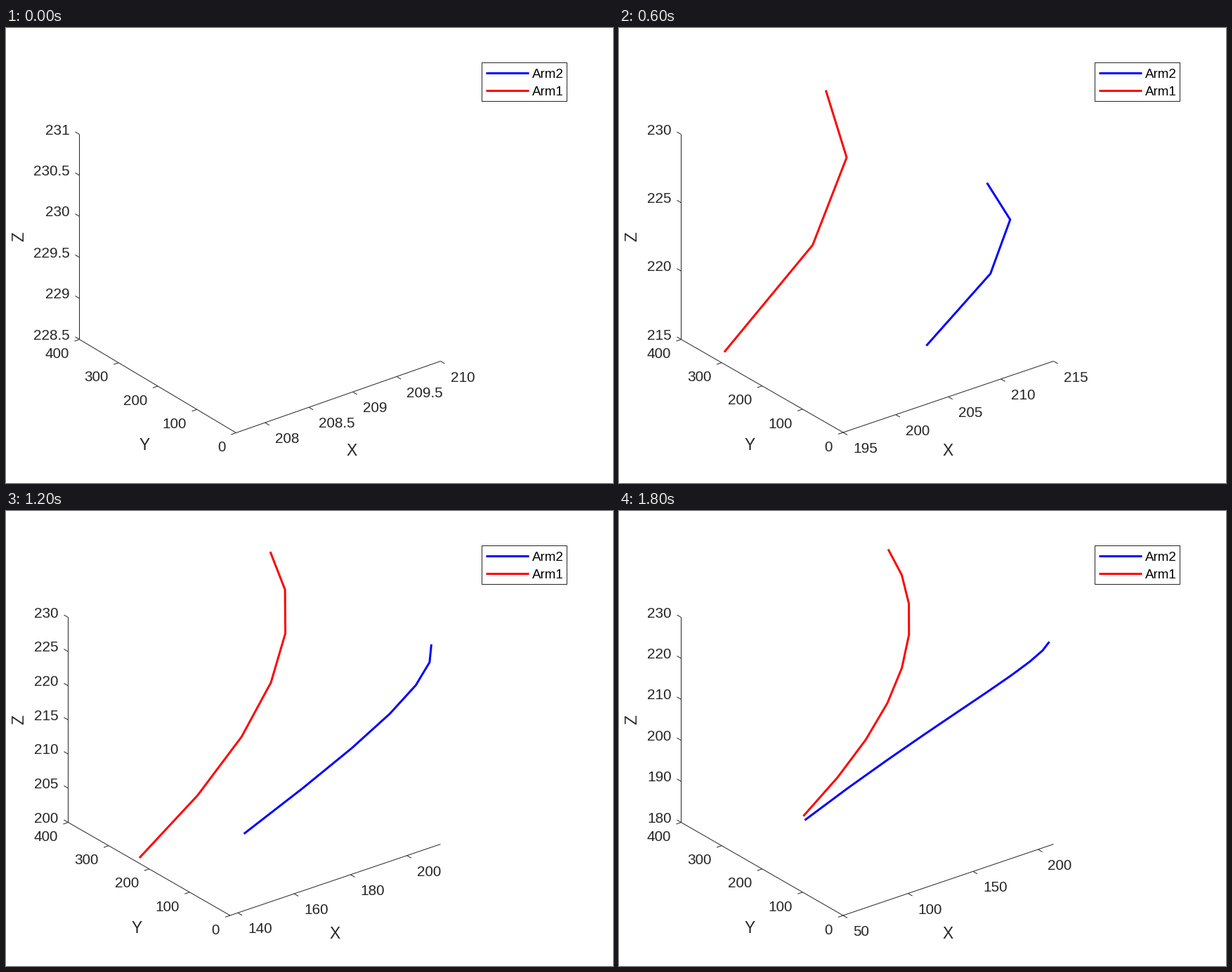
These frames come from a looping animation (864 by 648 pixels, 2000 ms). A matplotlib script:

```python
import numpy as np
import matplotlib.pyplot as plt
from matplotlib.animation import FuncAnimation
from matplotlib.patches import Rectangle

W, H = 864, 648
STEPS = 10
INK = "#262626"
TICK_SIZE, LABEL_SIZE, LEGEND_SIZE = 20.8, 22.9, 18.7
CAP = 0.345  # half the cap height, in ems

plt.rcParams["font.family"] = "Liberation Sans"
plt.rcParams["path.snap"] = False


def smooth_path(keys, count):
    """Smooth curve through {step: (x, y, z)}, sampled once per step."""
    curve = np.polyfit(list(keys), list(keys.values()), len(keys) - 1)
    steps = np.arange(count)[:, None]
    return sum(c * steps ** n for n, c in enumerate(curve[::-1]))


ARM1 = smooth_path({0: (208.67, 398, 229.7), 1: (209.46, 367, 225.1),
                    3: (195.4, 304, 215.6), 6: (137.26, 224, 200.8),
                    8: (76.1, 182, 191.1)}, STEPS - 1)
ARM2 = smooth_path({0: (208.67, 0, 229.7), 1: (211.92, 27, 225.7),
                    3: (206.2, 85.5, 216.97), 6: (167.0, 173, 201.9),
                    9: (99.6, 254, 183.5)}, STEPS)

fig = plt.figure(figsize=(W / 72, H / 72), dpi=72, facecolor="white")
ax = fig.add_axes([0, 0, 1, 1])


def nice_step(span, parts):
    """Smallest 1-2-5 step that splits span into at most that many parts."""
    raw = span / parts
    power = 10 ** np.floor(np.log10(raw))
    return next(m * power for m in (1, 2, 5, 10) if m * power >= raw)


def limits(values, parts, loose=False):
    """Axis start, end and tick step; loose ends may stay at the data."""
    low, high = values.min(), values.max()
    lone = high - low < 1e-6
    if lone:
        low, high = low - 1, high + 1
    step = nice_step(high - low, parts)
    start = np.floor(low / step) * step
    end = np.ceil(high / step) * step
    if loose and lone:
        start = low
    elif loose and (high - low) / (end - start) < 0.79:
        end = high
        if low - start > 0.8 * step:
            start = low
    return start, end, step


def ticks(start, end, step):
    first = np.ceil(start / step - 1e-6) * step
    return np.arange(first, end + step * 1e-3, step)


def stroke(points, color=INK, width=1.0):
    xs, ys = np.transpose(points)
    ax.plot(xs, ys, color=color, lw=width,
            solid_capstyle="butt", solid_joinstyle="round")


def label(x, y, text, size=TICK_SIZE, align="left", color=INK):
    """Place text with its capitals centred on y."""
    ax.text(x, y + CAP * size, text, size=size, ha=align,
            va="baseline", color=color)


def draw_axis(values, place, tick, offset, align):
    for value in values:
        p = place(value)
        stroke([p, p + tick])
        label(*(p + offset), f"{value:g}", align=align)


def draw_legend():
    ax.add_patch(Rectangle((677, 49), 121, 55, fc="white", ec=INK, lw=1))
    for y, color, name in ((64, "blue", "Arm2"), (89, "red", "Arm1")):
        stroke([(683, y), (744, y)], color, 3)
        label(748, y + 0.5, name, LEGEND_SIZE, color="black")


def draw(step):
    ax.clear()
    ax.set_xlim(-0.5, W - 0.5)
    ax.set_ylim(H - 0.5, -0.5)
    ax.axis("off")

    arms = [(ARM2[:step + 1], "blue"), (ARM1[:step + 1], "red")]
    data = np.vstack([arm for arm, _ in arms])
    x0, x1, dx = limits(data[:, 0], 4.5, loose=True)
    z0, z1, dz = limits(data[:, 2], 6)

    # Long tick labels push the axes to the right
    wide = dz < 1
    origin = np.array([327, 576] if wide else [318.5, 575.5])
    along_x = np.array([618, 474]) - origin
    along_y = np.array([104 if wide else 88, 443]) - origin
    along_z = np.array([0, -292])

    def project(x, y, z):
        return (origin + along_x * (x - x0) / (x1 - x0)
                + along_y * y / 400 + along_z * (z - z0) / (z1 - z0))

    stroke([origin + along_x, origin, origin + along_y])
    stroke([origin + along_y, origin + along_y + along_z])

    x_tick = -7 * along_y / np.hypot(*along_y)
    y_tick = -7.5 * along_x / np.hypot(*along_x)
    draw_axis(ticks(x0, x1, dx), lambda v: project(v, 0, z0),
              x_tick, (14, 22), "left")
    draw_axis(range(0, 401, 100), lambda v: project(x0, v, z0),
              y_tick, (-15, 19.5), "right")
    draw_axis(ticks(z0, z1, dz), lambda v: project(x0, 400, v),
              -x_tick, (-14, -7), "right")

    label(492 if wide else 468, 600.5, "X", LABEL_SIZE, "center")
    label(197 if wide else 186, 592.5, "Y", LABEL_SIZE, "center")
    ax.text(17 + CAP * LABEL_SIZE, 297, "Z", size=LABEL_SIZE, color=INK,
            rotation=90, rotation_mode="anchor", ha="center", va="baseline")

    for arm, color in arms:
        stroke([project(*p) for p in arm], color, 3)
    draw_legend()
    return []


anim = FuncAnimation(fig, draw, frames=STEPS, interval=200,
                     repeat=True, repeat_delay=0)
plt.show()
```
